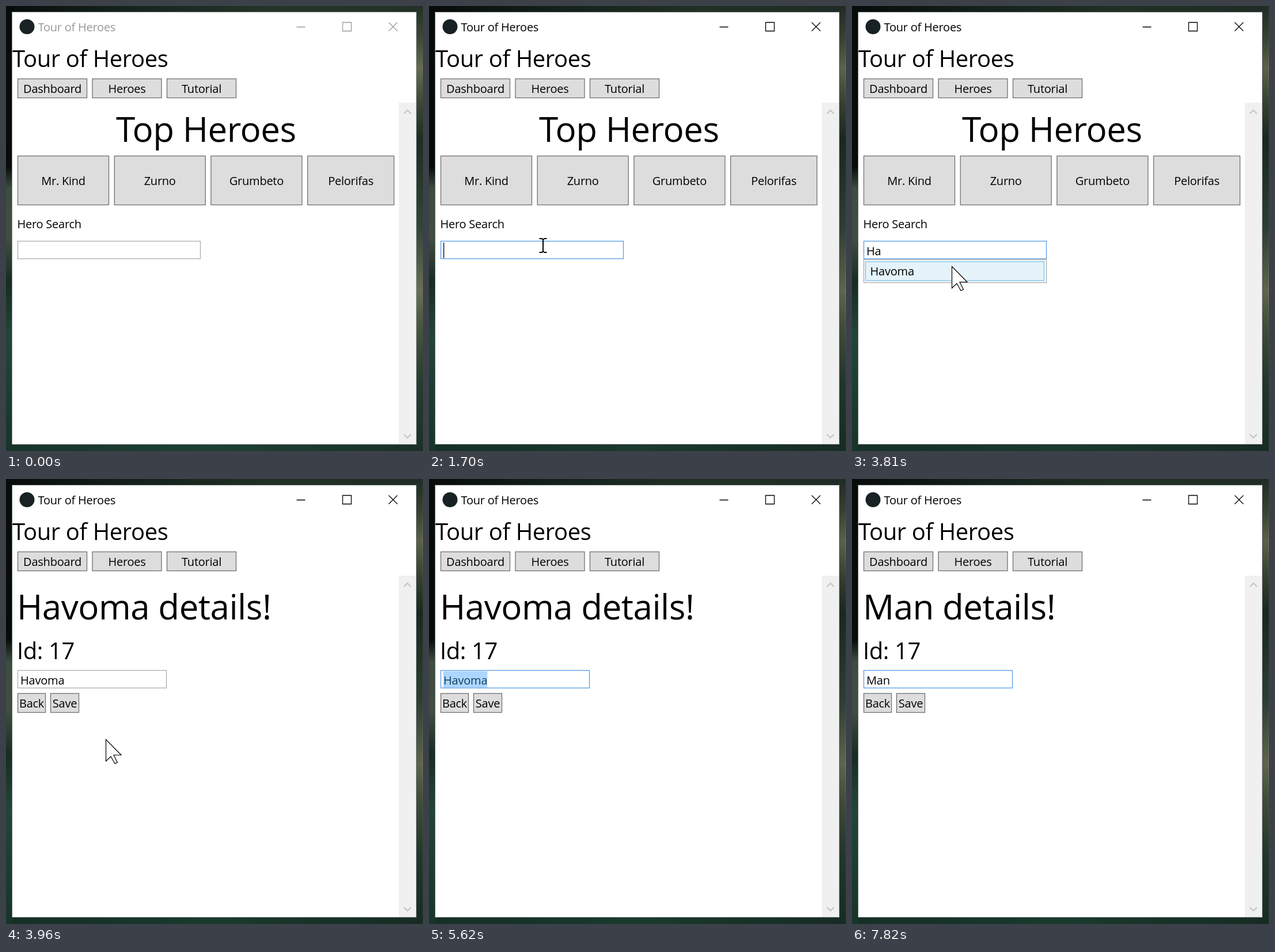
An HTML page for the animation above (8000 ms loop, 724 by 773 pixels).

```html
<!DOCTYPE html>
<html lang="en">
<head>
<meta charset="utf-8">
<title>Tour of Heroes</title>
<style>
  html, body { margin: 0; width: 100%; height: 100%; overflow: hidden; background: #12231c; }
  svg { display: block; width: 100%; height: 100%; }
  text { font: 20px "Open Sans", "Noto Sans", sans-serif; letter-spacing: -.012em; white-space: pre; }
  .large { font-size: 40px; letter-spacing: -.01em; }
  .huge { font-size: 60px; letter-spacing: -.008em; }
  .mid { text-anchor: middle; }
  .button { fill: #ddd; stroke: #707070; stroke-width: 1.3; }
  .field { fill: #fff; stroke: #abadb3; stroke-width: 1.3; }
  .field.focus { stroke: #569de5; }
  .popup { fill: #fff; stroke: #a8a8a8; stroke-width: 1.3; }
  .hover { fill: #e5f3fb; stroke: #70c0e7; stroke-width: 1.3; }
  .selection { fill: #39f; opacity: .4; }
  .line { fill: none; stroke-width: 1.3; }
</style>
</head>
<body>
<svg id="stage" viewBox="0 0 724 773" preserveAspectRatio="none">
  <defs>
    <linearGradient id="leftEdge" x2="0" y2="1">
      <stop offset="0" stop-color="#070c0b"/><stop offset=".36" stop-color="#060b09"/>
      <stop offset=".41" stop-color="#3d4c40"/><stop offset=".52" stop-color="#404e41"/>
      <stop offset=".62" stop-color="#172c22"/><stop offset=".74" stop-color="#234539"/>
      <stop offset=".88" stop-color="#1c3c31"/><stop offset="1" stop-color="#17342a"/>
    </linearGradient>
    <linearGradient id="rightEdge" x2="0" y2="1">
      <stop offset="0" stop-color="#233028"/><stop offset=".07" stop-color="#3c4737"/>
      <stop offset=".14" stop-color="#656c51"/><stop offset=".22" stop-color="#3a4636"/>
      <stop offset=".3" stop-color="#1c2c22"/><stop offset=".5" stop-color="#33443a"/>
      <stop offset=".64" stop-color="#687056"/><stop offset=".72" stop-color="#475440"/>
      <stop offset=".84" stop-color="#273c30"/><stop offset="1" stop-color="#193027"/>
    </linearGradient>
    <linearGradient id="topEdge">
      <stop offset="0" stop-color="#070c0b"/><stop offset=".3" stop-color="#16241d"/>
      <stop offset=".65" stop-color="#25352b"/><stop offset="1" stop-color="#233028"/>
    </linearGradient>
    <linearGradient id="bottomEdge">
      <stop offset="0" stop-color="#17342a"/><stop offset=".5" stop-color="#1d4033"/>
      <stop offset="1" stop-color="#193027"/>
    </linearGradient>
  </defs>
  <rect width="724" height="12" fill="url(#topEdge)"/>
  <rect y="760" width="724" height="13" fill="url(#bottomEdge)"/>
  <rect width="12" height="773" fill="url(#leftEdge)"/>
  <rect x="711" width="13" height="773" fill="url(#rightEdge)"/>
  <rect id="shadow" x="10" width="712" height="773" opacity=".1"/>
  <rect id="frame" x="10.500" y="10.500" width="702" height="751" fill="#fff"/>
  <circle cx="36.500" cy="36" r="13" fill="#182123"/>
  <g id="titleBar">
    <text x="55.500" y="44">Tour of Heroes</text>
    <path class="line" stroke="currentColor" d="M504.500 36.500H519.500M584.500 28.500H599.500V43.500H584.500ZM664.500 28.500L679.500 43.500M679.500 28.500L664.500 43.500"/>
  </g>
  <text class="large" x="11" y="106">Tour of Heroes</text>
  <g id="menu"></g>
  <rect x="682" y="168" width="30" height="593" fill="#f0f0f0"/>
  <path class="line" stroke="#c4c4c4" style="stroke-width:2" d="M691 187L697 181L703 187M691 744L697 750L703 744"/>

  <g id="dashboard">
    <text class="huge" x="191" y="236">Top Heroes</text>
    <g id="tiles"></g>
    <text x="19.500" y="386">Hero Search</text>
    <rect id="searchBox" class="field" x="20.500" y="408.500" width="317" height="30.500"/>
    <text id="searchText" x="25" y="433"></text>
    <g id="results"></g>
  </g>

  <g id="details">
    <text id="heading" class="huge" x="19" y="244"></text>
    <text class="large" x="19" y="313">Id: 17</text>
    <rect id="nameBox" class="field" x="20.500" y="332.500" width="258" height="30.500"/>
    <text id="nameText" x="25" y="357"></text>
    <rect id="selection" class="selection" y="334" height="28"/>
    <g id="actions"></g>
  </g>
  <rect id="caret" width="1.300" height="27"/>
  <path id="arrow" fill="#fff" stroke="#000" stroke-width="1.200" d="M.500 .500V38L9 30L16 42.500L20.500 40.500L14 27.500H27Z"/>
  <path id="beam" fill="none" stroke="#000" stroke-width="2" d="M-6.500 -12H-2.500L0 -10.500L2.500 -12H6.500M0 -10.500V10.500M-6.500 12H-2.500L0 10.500L2.500 12H6.500"/>
</svg>
<script>
const LOOP = 8000, TICK = 77;
const $ = id => document.getElementById(id);
const hero = 'Havoma';

const button = (x, y, w, h, label) =>
  `<rect class="button" x="${x + .5}" y="${y + .5}" width="${w - 1}" height="${h - 1}"/>` +
  `<text class="mid" x="${x + w / 2}" y="${y + h / 2 + 8}">${label}</text>`;

$('menu').innerHTML = ['Dashboard', 'Heroes', 'Tutorial']
  .map((label, i) => button(20 + 129.5 * i, 126, 121, 34, label)).join('');
$('tiles').innerHTML = ['Mr. Kind', 'Zurno', 'Grumbeto', 'Pelorifas']
  .map((label, i) => button(20 + 167.7 * i, 260, i < 3 ? 159 : 151, 86, label)).join('');
$('actions').innerHTML = button(20, 372, 49, 34, 'Back') + button(77, 372, 50, 34, 'Save');

// Each row changes only the listed parts of the state.
const steps = [
  [0, { active: false, page: 'dashboard', search: '', results: [], hover: false,
        focus: false, caret: false, name: hero, title: hero, selected: 0 }],
  [450, { active: true }],
  [1630, { focus: true, caret: true }],
  [1780, { search: 'H' }],
  [1870, { results: [hero, 'Hr OX', 'Marthok'] }],
  [2410, { caret: false }],
  [2940, { search: 'Ha', caret: true }],
  [3030, { results: [hero] }],
  [3500, { caret: false, hover: true }],
  [3960, { page: 'details', focus: false }],
  [5080, { focus: true }],
  [5230, { selected: 1 }],
  [5390, { selected: 2 }],
  [5460, { selected: 3 }],
  [5540, { selected: 4 }],
  [5620, { selected: 6 }],
  [6660, { name: 'M', title: 'M', selected: 0, caret: true }],
  [7040, { name: 'Ma', title: 'Ma' }],
  [7190, { name: 'Man' }],
  [7280, { title: 'Man' }],
  [7820, { caret: false }]
];

// time, pointer, x, y, glide towards the next row
const pointer = [
  [0, ''],
  [450, 'arrow', 300, 740, true],
  [690, 'arrow', 262, 600, true],
  [1010, 'arrow', 214, 455],
  [1090, 'beam', 200, 426, true],
  [1250, 'beam', 198, 419],
  [1400, 'beam', 198, 418],
  [1630, 'beam', 198, 416],
  [1780, ''],
  [3410, 'beam', 192, 433],
  [3500, 'arrow', 182, 446],
  [3580, 'arrow', 177, 448],
  [3730, 'arrow', 175, 450],
  [3810, 'arrow', 173, 452],
  [4430, ''],
  [4600, 'arrow', 173, 452],
  [4770, 'arrow', 167, 446, true],
  [5000, 'arrow', 122, 374],
  [5080, 'beam', 108, 350],
  [5160, 'beam', 102, 349, true],
  [5540, 'beam', 63, 357],
  [5620, '']
];

const show = (id, on) => { $(id).style.display = on ? '' : 'none'; };
const place = (id, attrs) => {
  for (const key in attrs) $(id).setAttribute(key, attrs[key]);
};

function drawResults(names, hover) {
  if (!names.length) return '';
  const rows = names.map((name, i) => `<text x="31.500" y="${468 + 34 * i}">${name}</text>`);
  return `<rect class="popup" x="20.500" y="440.500" width="317" height="${34 * names.length + 6}"/>` +
    (hover ? '<rect class="hover" x="23.500" y="444" width="310" height="33"/>' : '') + rows.join('');
}

function drawState(s) {
  const onDetails = s.page === 'details';
  show('dashboard', !onDetails);
  show('details', onDetails);
  show('shadow', s.active);
  place('frame', { stroke: s.active ? '#5c6662' : '#858c88' });
  $('titleBar').style.color = $('titleBar').style.fill = s.active ? '#000' : '#999';
  $('searchText').textContent = s.search;
  $('results').innerHTML = drawResults(s.results, s.hover);
  $('nameText').textContent = s.name;
  $('heading').textContent = s.title + ' details!';
  $('searchBox').classList.toggle('focus', s.focus);
  $('nameBox').classList.toggle('focus', s.focus);

  const text = $(onDetails ? 'nameText' : 'searchText');
  const width = text.textContent ? text.getComputedTextLength() : 0;
  show('caret', s.caret);
  place('caret', { x: 25 + width, y: onDetails ? 335 : 411 });

  const kept = s.name.length - s.selected;
  const start = onDetails && s.selected && kept ? text.getSubStringLength(0, kept) : 0;
  show('selection', s.selected > 0);
  place('selection', { x: 25 + start, width: Math.max(0, width - start) });
}

function drawPointer(t) {
  const i = pointer.findLastIndex(row => row[0] <= t);
  let [start, kind, x, y, glide] = pointer[i];
  if (glide) {
    const [end, , nextX, nextY] = [pointer[i + 1][0], '', pointer[i + 1][2], pointer[i + 1][3]];
    const p = Math.floor((t - start) / TICK) * TICK / (end - start);
    x += (nextX - x) * p;
    y += (nextY - y) * p;
  }
  for (const id of ['arrow', 'beam']) show(id, id === kind);
  if (kind) place(kind, { transform: `translate(${Math.round(x)} ${Math.round(y)})` });
}

let current = -1;
function render(t) {
  const index = steps.findLastIndex(row => row[0] <= t);
  if (index !== current) {
    current = index;
    drawState(Object.assign({}, ...steps.slice(0, index + 1).map(row => row[1])));
  }
  drawPointer(t);
}

const origin = performance.now();
function frame() {
  render((performance.now() - origin) % LOOP);
  requestAnimationFrame(frame);
}
frame();
</script>
</body>
</html>
```
